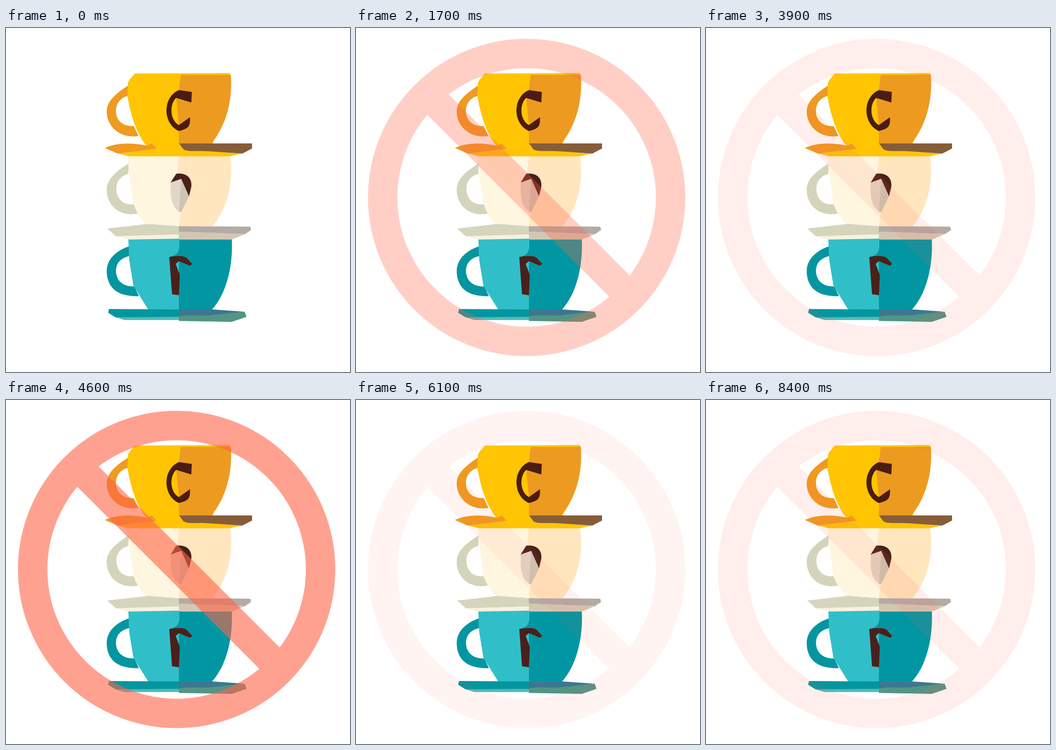
These frames come from a looping animation (748 px wide and 748 px high, 8.5 s). An HTML page:

```html
<!DOCTYPE html>
<html lang="en">
<head>
<meta charset="utf-8">
<title>No coffee</title>
<style>
  html, body { margin: 0; width: 100%; height: 100%; overflow: hidden; background: #fff; }
  svg { display: block; width: 100%; height: 100%; }
</style>
</head>
<body>
<svg viewBox="0 0 748 748">
  <g id="yellow-cup">
    <path fill="#ef9a20" d="M267 124C240 142 219 158 219 182C219 213 247 241 288 235L278 213C257 215 239 203 239 181C239 163 249 151 267 147Z"/>
    <path fill="#ffc502" d="M280 99L486 98L489 102L450 251L376 251L386 264L514 273L486 279H268L243 273L328 263L305 256C280 223 271 185 264 149L265 119L269 112Z"/>
    <path fill="#ed9a21" d="M380 102H489C493 160 478 212 447 251H376V210L370 152L376 135Z"/>
    <path fill="#ef9a20" d="M215 261C240 249 276 249 307 256L317 251L328 263L243 273Z"/>
    <path fill="#875c38" d="M376 251H535V262L514 273L440 268C420 266 396 270 386 264Z"/>
    <path fill="#4a1c12" d="M376 135L404 139L403 162L370 152C355 166 356 200 376 211L400 194C401 214 397 219 376 224C340 208 340 150 376 135Z"/>
  </g>

  <g id="cream-cup">
    <path fill="#d4d4bc" d="M267 294C245 309 219 325 219 352C219 388 250 412 289 403L277 383C252 386 240 368 240 350C240 332 250 322 266 317Z"/>
    <path fill="#fff6df" d="M265 279H380V431H309C294 417 281 398 277 380L268 320Z"/>
    <path fill="#ffe6be" d="M376 279H487C496 335 481 393 449 431H376L380 400L372 317Z"/>
    <path fill="#e2d6c6" d="M358 336L381 328L377 400C364 392 358 375 358 355Z"/>
    <path fill="#ccc6b4" d="M381 328L398 366L381 400H376Z"/>
    <path fill="#4a211a" d="M358 336L370 317C391 314 405 325 403 345L398 366L381 328Z"/>
    <path fill="#d4d5bc" d="M220 436L308 426L376 431V449L239 453Z"/>
    <path fill="#fbf1dc" d="M239 453L376 449V458L266 460Z"/>
    <path fill="#b3aba4" d="M376 431L531 432L533 439L520 448L376 443Z"/>
    <path fill="#d3c7b4" d="M376 443L520 448L491 460H376Z"/>
  </g>

  <g id="teal-cup">
    <path fill="#0396a1" d="M267 475C245 482 219 500 219 528C219 570 250 585 289 583L279 562C250 563 239 545 239 527C240 510 250 500 268 496Z"/>
    <path fill="#30bfc8" d="M266 460L377 458V612H309L277 560L268 505Z"/>
    <path fill="#0296a2" d="M377 460H491C494 520 478 580 448 612H376V497H358C372 495 378 485 377 470Z"/>
    <path fill="#4a211a" d="M355 498C370 495 385 495 392 499L405 513L400 517L376 507L369 513L378 537L376 581L361 579Z"/>
    <path fill="#0396a1" d="M224 611L376 612V629H238L222 619Z"/>
    <path fill="#50bdb6" d="M238 629L376 628V635H258Z"/>
    <path fill="#3c7791" d="M376 612H450L519 617L450 625L376 628Z"/>
    <path fill="#529585" d="M376 627C400 622 430 627 450 624L519 617L523 628L491 639L376 637Z"/>
  </g>

  <g id="sign" opacity="0" fill="none" stroke="#ff6347" stroke-width="64">
    <circle cx="371" cy="368.5" r="313"/>
    <path d="M150 138.3L592 580.3"/>
  </g>
</svg>
<script>
  const LOOP = 8500, STEP = 100;
  // Opacity runs linearly between 0 and 1 from one turn to the next.
  const turns = [0, 1000, 2000, 3000, 4000, 5000, 6000, 7500, LOOP];
  const sign = document.getElementById("sign");

  function opacityAt(time) {
    const i = turns.findIndex(turn => turn > time) - 1;
    const progress = (time - turns[i]) / (turns[i + 1] - turns[i]);
    return i % 2 ? 1 - progress : progress;
  }

  const start = performance.now();
  function draw() {
    const time = (performance.now() - start) % LOOP;
    sign.setAttribute("opacity", opacityAt(Math.floor(time / STEP) * STEP));
    requestAnimationFrame(draw);
  }
  draw();
</script>
</body>
</html>
```
